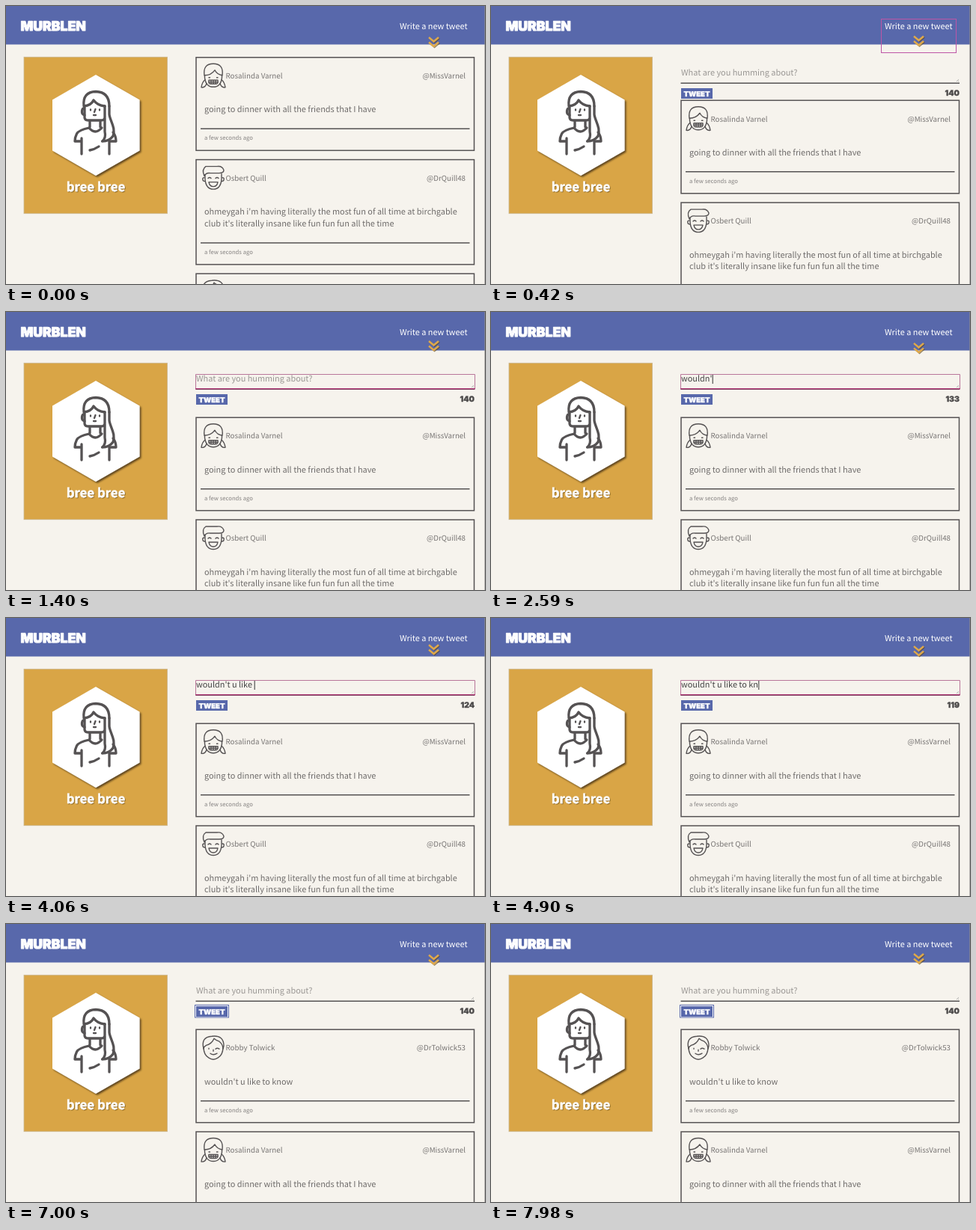
Animation, 640 px wide and 372 px high, one loop 8.05 s. Source, as an HTML page:

```html
<!DOCTYPE html>
<html lang="en">
<head>
<meta charset="utf-8">
<title>Murblen</title>
<style>
  html, body { margin: 0; width: 100%; height: 100%; overflow: hidden; background: #f6f3ed; }
  svg { display: block; width: 640px; height: 372px; }
  text {
    font-family: "Noto Sans CJK JP", "Noto Sans CJK SC", "Noto Sans CJK", "Open Sans", sans-serif;
    font-weight: 300; font-size: 10.9px; fill: #6f6c6b;
    white-space: pre; text-rendering: geometricPrecision;
  }
  .slab {
    font-family: Inter, Roboto, sans-serif; font-weight: 900;
    stroke-linejoin: round; paint-order: stroke;
  }
  .brand { font-size: 17.6px; fill: #fff; stroke: #fff; stroke-width: .9; }
  .send { font-size: 9.5px; fill: #fff; stroke: #fff; stroke-width: .4; }
  .count { font-size: 10.4px; fill: #4c4a4a; stroke: #4c4a4a; stroke-width: .3; }
  .link { fill: #fff; font-weight: 400; }
  .user { font-size: 16.8px; font-weight: 700; fill: #fff; stroke: #fff; stroke-width: .4; }
  .name { font-size: 9.75px; fill: #777473; }
  .time { font-size: 7.7px; fill: #858281; }
  .hint { fill: #9a9794; }
  .typed { font-weight: 400; fill: #444; }
  .end { text-anchor: end; }
  .mid { text-anchor: middle; }
  .line { fill: none; stroke: #555253; stroke-width: 1.6; stroke-linecap: round; stroke-linejoin: round; }
  .focus { fill: none; stroke: #bd55a6; }
</style>
</head>
<body>
<svg viewBox="0 0 640 372">
  <defs>
    <filter id="drop" x="-20%" y="-20%" width="140%" height="140%">
      <feDropShadow dx="2" dy="2" stdDeviation="1.3" flood-color="#3a2a10" flood-opacity=".75"/>
    </filter>
    <filter id="soft" x="-10%" y="-30%" width="120%" height="170%">
      <feDropShadow dx="1" dy="1" stdDeviation=".6" flood-color="#5a4010" flood-opacity=".6"/>
    </filter>
    <clipPath id="fold"><rect id="foldBox" x="250" y="60" width="380" height="0"/></clipPath>
  </defs>

  <rect width="640" height="372" fill="#f6f3ed"/>

  <g id="form" clip-path="url(#fold)">
    <text id="hint" class="hint" x="254" y="93">What are you humming about?</text>
    <text id="typed" class="typed" x="254" y="93"></text>
    <path id="caret" d="M0 84v12" stroke="#333" stroke-width="1"/>
    <path d="M253.5 103.3H626" stroke="#555253" stroke-width="1.5"/>
    <path d="M622 101l3-3M624 101l1-1" stroke="#999" stroke-width=".7"/>
    <g id="areaFocus">
      <path d="M253.5 103V83.5H626.5V103" fill="none" stroke="#b9769a"/>
      <path d="M253 102.8H627" stroke="#b03a78" stroke-width="1.6"/>
    </g>
    <rect id="sendFocus" x="252.5" y="108.5" width="45" height="16.5" fill="#fff" stroke="#5868ab"/>
    <rect x="254" y="110" width="42" height="14" fill="#5868ab"/>
    <text class="slab send" x="257.5" y="120.5">TWEET</text>
    <text id="count" class="slab count end" x="626" y="119.5">140</text>
  </g>

  <g id="cards"></g>

  <rect width="640" height="51.5" fill="#5868ab"/>
  <text class="slab brand" x="19.5" y="32.7">MURBLEN</text>
  <text class="link" x="526" y="31.2">Write a new tweet</text>
  <path id="arrow" d="M-6.5-6L0-.5L6.5-6M-6.500 .5L0 6L6.500 .5" fill="none" stroke="#dfa94c" stroke-width="2.4" filter="url(#soft)"/>
  <rect id="linkFocus" class="focus" x="521.5" y="17.5" width="100" height="45"/>

  <rect x="24" y="68.3" width="191.500" height="209.400" fill="#d9a546" stroke="#c9b48a" stroke-width=".8"/>
  <path d="M120 92L178.500 125.500V193.500L120 227L62 193.500V125.500Z" fill="#fff" filter="url(#drop)"/>
  <g class="line" style="stroke-width:3.3">
    <path d="M105 134V149Q105 153 110 153H127Q132 153 132 149V134"/>
    <path d="M105 146Q101 145 101.500 140.500Q102 137 104 137"/>
    <path d="M104 134Q102 115 120 114.500Q138 115 138 134M104 134Q114 133 117 126Q122 133 132 134"/>
    <path d="M138 134V145C139 154 147 163 143 174Q138 181 128.500 181Q134 177 132 168V151"/>
    <path d="M112 155V162M126 155V162M111 163Q119 173 128 163"/>
    <path d="M111 163Q97 166 94.500 171Q92 176 92 181H101V198M101 181V177M143 169Q147 174 147 181H138V198"/>
    <path d="M112 193Q118 192 124 188"/>
    <path d="M113 138.500V139.500M125 138.500V139.500M119.500 138L118 142M117 146H120" style="stroke-width:2.3"/>
  </g>
  <text class="user mid" x="120" y="248.3" filter="url(#soft)">bree bree</text>
  <path d="M639.5 0V372" stroke="#8f8c8c" stroke-opacity=".6"/>
</svg>

<script>
const LOOP = 8050, STEP = 70;
const OPEN = 140, FOCUS = 850, SENT = 6860;
const SLIDE = 400, GAP = 72.4;
const MESSAGE = "wouldn't u like to know";
const TYPE_START = 1435, KEY = 163, LIMIT = 140;
const LINE = 15.8;
const BOB = 870;
const bobSteps = [[0, 48], [.17, 46], [.33, 47.5], [.48, 46.5], [.61, 45], [.667, 42], [.84, 47], [1, 48]];

// Avatars are drawn around the centre of the head.
const faces = {
  girl: `<path d="M-12 0Q-14-15.500 0-15.500Q14-15.500 12 0Q5-1 2-7Q-3 0-12 0Z"/>
    <path d="M-11.500 0V3Q-10 15.500 0 15.500Q10 15.500 11.500 3V0"/>
    <path d="M-11 6Q-15 9-16 16Q-11 17-9 11M11 6Q15 9 16 16Q11 17 9 11"/>
    <path d="M-6 3H-4.500M4.500 3H6"/>
    <path d="M-6 6.500H6Q7 11.500 3 11.500H-3Q-7 11.500-6 6.500ZM-6 9H6M-3 6.500V11.500M0 6.500V11.500M3 6.500V11.500"/>`,
  boy: `<path d="M-11-4V2Q-10 15.500 0 15.500Q10 15.500 11 2V-5"/>
    <path d="M-12-2Q-16-11-10-15H5Q12-16 14-10Q14-6 8-6H-4Q-10-7-12-2Z"/>
    <path d="M-12 0Q-15 0-14 3Q-14 5-11 5M12 0Q15 0 14 3Q14 5 11 5"/>
    <path d="M-7 1Q-5-1-3 1M3 1Q5-1 7 1M-6 6H6Q5 12 0 12Q-5 12-6 6Z"/>`,
  lad: `<path d="M-13-1Q-13 10-6 14Q0 18 6 14Q13 10 13-1"/>
    <path d="M-13 2Q-17-14-2-15Q14-17 14-2L13 2Q13-4 8-8Q3-10 1-12Q-2-5-9-3Q-13-1-13 2Z"/>
    <path d="M-6 1V2M3 2Q5 0 8 2M0 3V5M-4 8Q0 11 5 8"/>`
};

const varnel = {
  face: "girl", name: "Rosalinda Varnel", handle: "@MissVarnel",
  lines: ["going to dinner with all the friends that I have"]
};
const quill = {
  face: "boy", name: "Osbert Quill", handle: "@DrQuill48",
  lines: ["ohmeygah i'm having literally the most fun of all time at birchgable",
          "club it's literally insane like fun fun fun all the time"]
};
const tolwick = { face: "lad", name: "Robby Tolwick", handle: "@DrTolwick53", lines: [MESSAGE] };

const $ = id => document.getElementById(id);
const show = (id, on) => { $(id).style.display = on ? "" : "none"; };
const extraHeight = post => (post.lines.length - 1) * LINE;

function card(post, top) {
  const extra = extraHeight(post);
  const lines = post.lines.map((s, i) => `<text x="265" y="${73.5 + i * LINE}">${s}</text>`).join("");
  return `<g transform="translate(0 ${top})">
    <rect x="254" y="0" width="371.5" height="${124.5 + extra}" fill="none" stroke="#555253" stroke-width="1.5"/>
    <g class="line" style="stroke-width:1.4" transform="translate(277 24)">${faces[post.face]}</g>
    <text class="name" x="293.5" y="28.3">${post.name}</text>
    <text class="name end" x="614" y="28.3">${post.handle}</text>
    ${lines}
    <path d="M260 ${95.5 + extra}H619.5" stroke="#555253" stroke-width="1.5"/>
    <text class="time" x="265" y="${110.5 + extra}">a few seconds ago</text>
  </g>`;
}

function feed(posts) {
  let top = 68.8;
  return "<g>" + posts.map(p => {
    const html = card(p, top);
    top += 136.8 + extraHeight(p);
    return html;
  }).join("") + "</g>";
}

$("cards").innerHTML = feed([varnel, quill, tolwick]) + feed([tolwick, varnel, quill]);
const [before, after] = $("cards").children;

function bobAt(t) {
  const p = t % BOB / BOB;
  const i = bobSteps.findIndex(s => s[0] > p);
  const [p0, y0] = bobSteps[i - 1], [p1, y1] = bobSteps[i];
  return y0 + (y1 - y0) * (p - p0) / (p1 - p0);
}

function draw(t) {
  const k = Math.min(1, Math.max(0, (t - OPEN) / SLIDE));
  const shift = GAP * (.5 - .5 * Math.cos(Math.PI * k));
  const sent = t >= SENT;
  const writing = t >= FOCUS && !sent;
  const keys = Math.max(0, Math.min(MESSAGE.length, Math.floor((t - TYPE_START) / KEY)));
  const count = sent ? 0 : keys;

  $("cards").setAttribute("transform", `translate(0 ${shift})`);
  $("foldBox").setAttribute("height", shift > 0 ? shift + 8.8 : 0);
  before.style.display = sent ? "none" : "";
  after.style.display = sent ? "" : "none";

  $("typed").textContent = MESSAGE.slice(0, count);
  $("count").textContent = LIMIT - count;
  show("hint", count === 0);

  const lastInput = keys ? TYPE_START + keys * KEY : FOCUS;
  show("caret", writing && (t - lastInput) % 1000 < 500);
  const width = count ? $("typed").getComputedTextLength() : 0;
  $("caret").setAttribute("transform", `translate(${254.8 + width} 0)`);

  show("linkFocus", t >= OPEN && t < FOCUS);
  show("areaFocus", writing);
  show("sendFocus", sent);
  $("arrow").setAttribute("transform", `translate(571.5 ${bobAt(t)})`);
}

const start = performance.now();
function tick() {
  const t = (performance.now() - start) % LOOP;
  draw(Math.floor(t / STEP) * STEP);
  requestAnimationFrame(tick);
}
tick();
</script>
</body>
</html>
```
